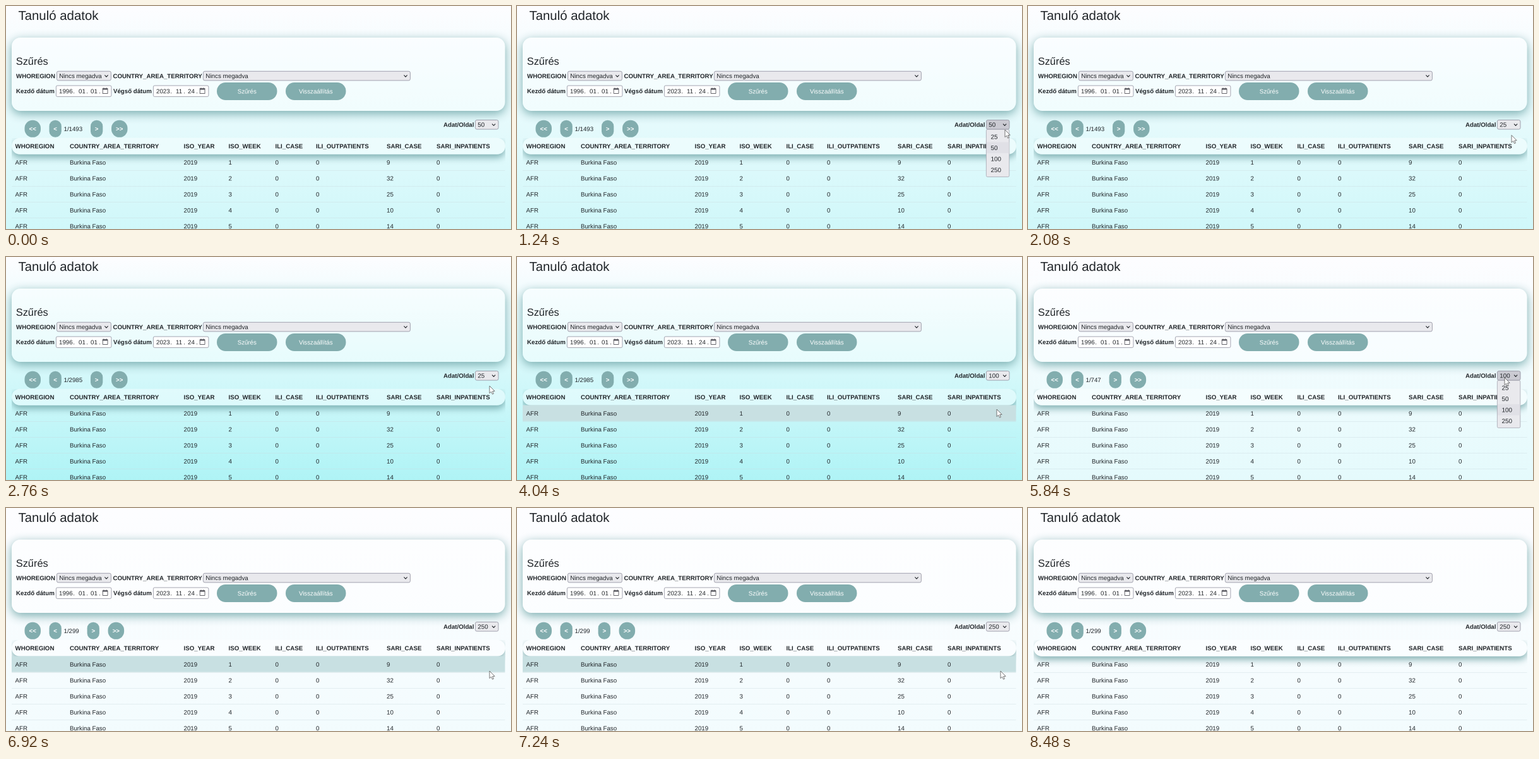
An HTML page with a canvas that plays this animation: 800x353 px, repeating every 8.84 s.

```html
<!DOCTYPE html>
<html lang="hu">
<head>
<meta charset="utf-8">
<title>Tanuló adatok</title>
<style>
html, body { margin: 0; width: 100%; height: 100%; overflow: hidden; background: #fcfdff; }
canvas { display: block; width: 800px; height: 353px; }
</style>
</head>
<body>
<canvas id="stage"></canvas>
<script>
const W = 800, H = 353, LOOP = 8840;
const canvas = document.getElementById('stage');
const dpr = window.devicePixelRatio || 1;
canvas.width = W * dpr;
canvas.height = H * dpr;
const ctx = canvas.getContext('2d');

const FONT = '"Liberation Sans", Arial, sans-serif';
const INK = '#212529', TEAL = '#82adae', BORDER = '#8f8f9d';
const ROW_TOP = 234.5, ROW_H = 25.2;
const ITEM_TOP = 198, ITEM_H = 17.5;
const SIZES = [25, 50, 100, 250];
const PAGES = { 25: 2985, 50: 1493, 100: 747, 250: 299 };

const COLUMNS = [
  [14.5, 'WHOREGION', () => 'AFR'],
  [101, 'COUNTRY_AREA_TERRITORY', () => 'Burkina Faso'],
  [281.5, 'ISO_YEAR', () => '2019'],
  [352.5, 'ISO_WEEK', i => i + 1],
  [426.5, 'ILI_CASE', () => '0'],
  [491, 'ILI_OUTPATIENTS', () => '0'],
  [603, 'SARI_CASE', i => [9, 32, 25, 10, 14][i]],
  [682, 'SARI_INPATIENTS', () => '0']
];

// time, page size
const LOADS = [[0, 50], [2120, 25], [4120, 100], [6800, 250]];
// open, close
const MENUS = [[1000, 2040], [3040, 4000], [5560, 6680]];
// time, x, y of the pointer tip
const PATH = [
  [360, 801, 204], [840, 768, 188], [1080, 769, 188], [1240, 773, 196],
  [1560, 766, 205], [2600, 766, 204], [2760, 766, 204], [2960, 764, 188],
  [3120, 764, 188], [3640, 760, 241], [4120, 760, 241], [4640, 760, 241],
  [4800, 760, 241], [5320, 755, 190], [5840, 755, 191], [6000, 756, 193],
  [6440, 766, 258], [7400, 766, 258], [7720, 801, 264]
];

function text(str, x, y, { size = 9.7, bold = false, color = INK, align = 'left' } = {}) {
  ctx.save();
  ctx.font = `${bold ? 'bold ' : ''}${size}px ${FONT}`;
  ctx.textRendering = 'geometricPrecision';
  ctx.fillStyle = color;
  ctx.textAlign = align;
  ctx.translate(x, y);
  // A hair of skew keeps the small glyphs unhinted
  ctx.transform(1, 0.0005, 0, 1, 0, 0);
  ctx.fillText(str, 0, 0);
  ctx.restore();
}

function box(x, y, w, h, r, fill, stroke) {
  ctx.beginPath();
  ctx.roundRect(x, y, w, h, r);
  ctx.fillStyle = fill;
  ctx.fill();
  if (stroke) {
    ctx.strokeStyle = stroke;
    ctx.lineWidth = 0.8;
    ctx.stroke();
  }
}

// Translucent panel whose shadow falls only outside its edge;
// the shape casting the shadow stays off the stage.
function panel(x, y, w, h, r, dy, blur, shade, bounds) {
  ctx.save();
  ctx.beginPath();
  ctx.rect(...bounds);
  ctx.clip();
  ctx.beginPath();
  ctx.rect(0, 0, W, H);
  ctx.roundRect(x, y, w, h, r);
  ctx.clip('evenodd');
  ctx.shadowColor = shade;
  ctx.shadowBlur = blur * dpr;
  ctx.shadowOffsetX = 2 * W * dpr;
  ctx.shadowOffsetY = dy * dpr;
  box(x - 2 * W, y, w, h, r, '#000');
  ctx.restore();
  box(x, y, w, h, r, 'rgba(255,255,255,.36)');
}

function chevron(x, y) {
  ctx.beginPath();
  ctx.moveTo(x - 2.6, y - 1.3);
  ctx.lineTo(x, y + 1.4);
  ctx.lineTo(x + 2.6, y - 1.3);
  ctx.strokeStyle = INK;
  ctx.lineWidth = 1.1;
  ctx.stroke();
}

function select(x, y, w, label, fill = '#e9e9ed') {
  box(x + 0.4, y, w, 14.6, 2.5, fill, BORDER);
  text(label, x + 4.3, y + 10.8, { size: 9.8 });
  chevron(x + w - 7, y + 7.4);
}

function dateField(x, parts) {
  box(x + 0.4, 126, 87.5, 17.4, 2, '#fff', BORDER);
  [5, 36, 55].forEach((dx, i) => text(parts[i], x + dx, 138.2));
  [27.3, 48.3, 68.3].forEach(dx => text('.', x + dx, 138.2));
  ctx.strokeStyle = '#55555c';
  ctx.lineWidth = 0.9;
  ctx.strokeRect(x + 74.2, 130.7, 7.8, 7.8);
  ctx.fillStyle = '#55555c';
  ctx.fillRect(x + 74, 130.7, 8, 1.8);
  ctx.fillRect(x + 75.5, 129.3, 1, 1.5);
  ctx.fillRect(x + 79.5, 129.3, 1, 1.5);
}

function button(x, y, w, h, r, label, bold) {
  box(x, y, w, h, r, TEAL);
  text(label, x + w / 2, y + h / 2 + 3.4, { bold, color: '#fff', align: 'center' });
}

function background(size) {
  const g = ctx.createLinearGradient(0, 0, 0, 240 + size * 25);
  g.addColorStop(0, 'rgb(253,253,255)');
  g.addColorStop(1, 'rgb(62,230,232)');
  ctx.fillStyle = g;
  ctx.fillRect(0, 0, W, H);
}

function filters() {
  text('Tanuló adatok', 19.5, 22, { size: 20.4 });
  panel(9, 50, 781.5, 116, 14, 4.5, 16, 'rgba(110,165,167,.92)', [0, 0, W, H]);
  text('Szűrés', 15.7, 93, { size: 16.4 });
  text('WHOREGION', 16, 114.2, { bold: true });
  select(80, 103.3, 86, 'Nincs megadva');
  text('COUNTRY_AREA_TERRITORY', 169.5, 114.2, { bold: true });
  select(312, 103.3, 328, 'Nincs megadva');
  text('Kezdő dátum', 16, 138, { bold: true });
  dateField(79, ['1996', '01', '01']);
  text('Végső dátum', 170, 138, { bold: true });
  dateField(233, ['2023', '11', '24']);
  button(334, 121, 95.5, 28, 14, 'Szűrés');
  button(443, 121, 95.5, 28, 14, 'Visszaállítás');
}

function pager(size) {
  const label = '1/' + PAGES[size];
  button(29.5, 180.8, 25.5, 27, 12.5, '<<', true);
  button(68.5, 180.8, 19.3, 27, 9.6, '<', true);
  text(label, 91.5, 198);
  const x = 106.9 + String(PAGES[size]).length * 5.4 + 5.5;
  button(x, 180.8, 19.3, 27, 9.6, '>', true);
  button(x + 33, 180.8, 25.5, 27, 12.5, '>>', true);
}

function table(hover) {
  panel(9, 208.8, 782, 26, 13, 5.5, 11, 'rgba(100,155,158,.75)', [9, 209, 782, 51]);
  for (const [x, name] of COLUMNS) text(name, x, 225.2, { bold: true });
  for (let i = 0; i < 5; i++) {
    const y = ROW_TOP + i * ROW_H;
    if (i === hover) {
      ctx.fillStyle = '#c8e0e2';
      ctx.fillRect(9, y, 781.5, ROW_H);
    }
    ctx.fillStyle = 'rgba(200,215,220,.4)';
    ctx.fillRect(9, Math.round(y + ROW_H), 781.5, 1);
    for (const [x, , cell] of COLUMNS) text(cell(i), x, y + 16.6);
  }
}

function menu(size, tip) {
  box(743.4, 195.4, 36.4, 75, 2, '#e9e9ed', '#a5a5b0');
  const over = Math.floor((tip.y - ITEM_TOP) / ITEM_H);
  const active = over >= 0 && over < 4 ? over : SIZES.indexOf(size);
  SIZES.forEach((n, i) => {
    const y = ITEM_TOP + i * ITEM_H;
    if (i === active) {
      ctx.fillStyle = '#e0e0e6';
      ctx.fillRect(744, y, 35.4, ITEM_H);
    }
    text(n, 750.5, y + 12.5, { size: 9.9 });
  });
}

function pointer({ x, y }) {
  const pts = [[0, 0], [0, 11.6], [2.7, 9.2], [4.5, 13.2], [6.4, 12.4], [4.7, 8.5], [8.2, 8.3]];
  ctx.beginPath();
  for (const [dx, dy] of pts) ctx.lineTo(x + dx, y + dy);
  ctx.closePath();
  ctx.fillStyle = '#fff';
  ctx.fill();
  ctx.strokeStyle = '#555';
  ctx.lineWidth = 0.8;
  ctx.lineJoin = 'round';
  ctx.stroke();
}

function pointerAt(t) {
  const i = PATH.findIndex(p => p[0] > t);
  if (i < 1) return null;
  const [t0, x0, y0] = PATH[i - 1], [t1, x1, y1] = PATH[i];
  const u = (t - t0) / (t1 - t0), e = u * u * (3 - 2 * u);
  return { x: x0 + (x1 - x0) * e, y: y0 + (y1 - y0) * e };
}

function draw(t) {
  const size = LOADS.filter(l => l[0] <= t).pop()[1];
  const open = MENUS.some(([a, b]) => t >= a && t < b);
  // The chosen size shows as soon as its menu closes, before the page reloads
  const closed = MENUS.filter(m => m[1] <= t).length;
  const picked = LOADS[closed][1];
  const tip = pointerAt(t);
  const onRow = tip && !open && tip.x < 790.5 && tip.y >= ROW_TOP;
  const onSelect = tip && tip.x > 743 && tip.x < 780 && tip.y > 180 && tip.y < 195;

  ctx.setTransform(dpr, 0, 0, dpr, 0, 0);
  background(size);
  filters();
  pager(size);
  table(onRow ? Math.floor((tip.y - ROW_TOP) / ROW_H) : -1);
  text('Adat/Oldal', 693, 191.3, { bold: true });
  select(743, 180.5, 36.6, picked, open ? '#cacad2' : onSelect ? '#d5d5dc' : '#e9e9ed');
  if (open) menu(size, tip);
  if (tip) pointer(tip);
}

const start = performance.now();
function tick() {
  draw((performance.now() - start) % LOOP);
  requestAnimationFrame(tick);
}
tick();
</script>
</body>
</html>
```
